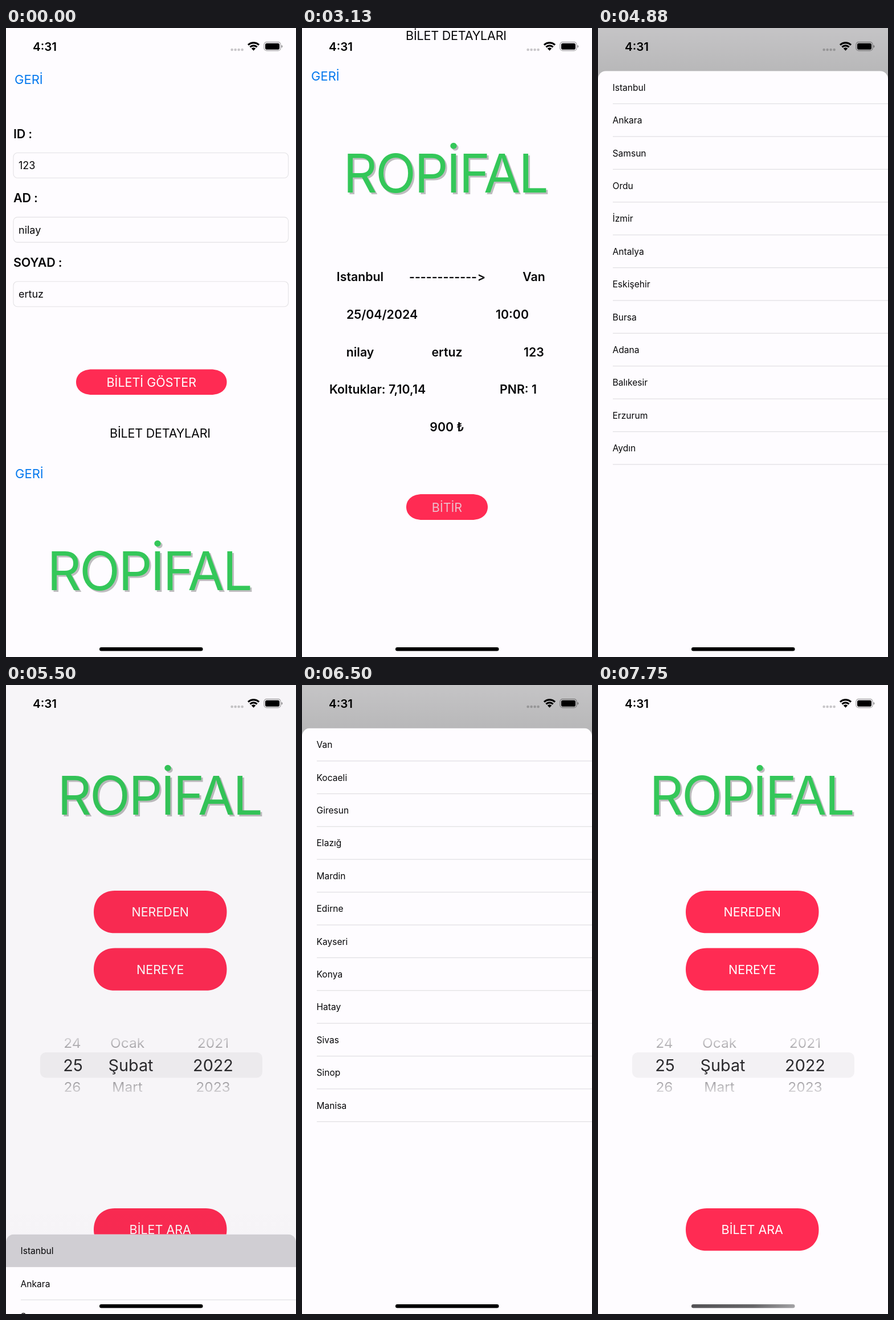
These frames come from a looping animation (509x1101 px, 8000 ms). An HTML page with a canvas:

```html
<!DOCTYPE html>
<html lang="tr">
<head>
<meta charset="utf-8">
<title>Bilet</title>
<style>
html, body { margin: 0; width: 100%; height: 100%; overflow: hidden; background: #fefcff; }
canvas { display: block; width: 100vw; height: 100vh; }
</style>
</head>
<body>
<canvas id="stage" width="509" height="1101"></canvas>
<script>
const W = 509, H = 1101, LOOP = 8000, TICK = 125;
const BG = '#fefcff', RED = '#ff2b53', BLUE = '#0579ee', GREEN = '#34c759', INK = '#070709';
const PRESSED = '#ecbecb';
const FACE = 'Inter, Roboto, "Noto Sans", sans-serif';
const ROW = 57.4, SHEET_TOP = 74;
const BRAND = 'ROPİFAL', FIRST = 'nilay', LAST = 'ertuz';
const FROM = ['Istanbul', 'Ankara', 'Samsun', 'Ordu', 'İzmir', 'Antalya',
  'Eskişehir', 'Bursa', 'Adana', 'Balıkesir', 'Erzurum', 'Aydın'];
const TO = ['Van', 'Kocaeli', 'Giresun', 'Elazığ', 'Mardin', 'Edirne',
  'Kayseri', 'Konya', 'Hatay', 'Sivas', 'Sinop', 'Manisa'];

const ctx = document.getElementById('stage').getContext('2d');

// Critically damped spring: distance left to travel, from 1 to 0.
function left(ms) {
  const x = Math.max(0, ms) * 0.0175;
  return (1 + x) * Math.exp(-x);
}

function text(str, x, y, size, { weight = 400, color = INK, align = 'left', gap = 0 } = {}) {
  ctx.font = `${weight} ${size}px ${FACE}`;
  ctx.letterSpacing = gap + 'px';
  ctx.textAlign = align;
  ctx.fillStyle = color;
  ctx.fillText(str, x, y);
}

function box(x, y, w, h, r, color) {
  ctx.beginPath();
  ctx.roundRect(x, y, w, h, r);
  ctx.fillStyle = color;
  ctx.fill();
}

// Rounded box with smooth corners reaching ex along and ey down the sides.
function smoothBox(x, y, w, h, ex, ey) {
  const r = x + w, b = y + h, k = 0.4, cx = ex * k, cy = ey * k;
  ctx.beginPath();
  ctx.moveTo(x + ex, y);
  ctx.lineTo(r - ex, y);
  ctx.bezierCurveTo(r - cx, y, r, y + cy, r, y + ey);
  ctx.lineTo(r, b - ey);
  ctx.bezierCurveTo(r, b - cy, r - cx, b, r - ex, b);
  ctx.lineTo(x + ex, b);
  ctx.bezierCurveTo(x + cx, b, x, b - cy, x, b - ey);
  ctx.lineTo(x, y + ey);
  ctx.bezierCurveTo(x, y + cy, x + cx, y, x + ex, y);
  ctx.fillStyle = RED;
  ctx.fill();
}

function button(label, x, y, w, h, pressed) {
  smoothBox(x, y, w, h, h > 60 ? 37 : 28, h / 2);
  text(label, x + w / 2, y + h / 2 + 8, 21.5, { align: 'center', color: pressed ? PRESSED : '#fff' });
}

function brand(cx, y) {
  const style = { align: 'center', gap: -3 };
  text(BRAND, cx + 2, y + 2.5, 93, { ...style, color: 'rgba(0,0,0,.25)' });
  text(BRAND, cx - 1, y, 93, { ...style, color: GREEN });
}

function fill(color) {
  ctx.fillStyle = color;
  ctx.fillRect(0, 0, W, H);
}

function form() {
  fill(BG);
  text('GERİ', 15, 98, 22, { color: BLUE });
  [['ID :', '123'], ['AD :', FIRST], ['SOYAD :', LAST]].forEach(([label, value], i) => {
    const y = 218.5 + i * 112.6;
    text(label, 13, y - 26, 21.5, { weight: 600, gap: -0.2 });
    ctx.beginPath();
    ctx.roundRect(13, y, 482.5, 44, 7);
    ctx.strokeStyle = '#e3e2e5';
    ctx.lineWidth = 1.1;
    ctx.stroke();
    text(value, 22, y + 28.7, 18);
  });
  button('BİLETİ GÖSTER', 123, 597.5, 264.5, 44.5);
}

function ticket(y, pressed) {
  ctx.save();
  ctx.translate(0, y);
  fill(BG);
  text('BİLET DETAYLARI', 270.5, 21, 21.5, { align: 'center', gap: -0.2 });
  text('GERİ', 16, 92, 22, { color: BLUE });
  brand(252, 288);
  const bold = (str, cx, base) => text(str, cx, base, 21.3, { weight: 600, align: 'center' });
  bold('Istanbul', 102, 443);
  bold('-'.repeat(12), 247.5, 443);
  bold('>', 315, 443);
  bold('Van', 407, 443);
  bold('25/04/2024', 140.5, 509);
  bold('10:00', 369, 509);
  bold(FIRST, 102, 574.5);
  bold(LAST, 254.5, 574.5);
  bold('123', 407, 574.5);
  bold('Koltuklar: 7,10,14', 132.5, 640);
  bold('PNR: 1', 379.5, 640);
  bold('900 ₺', 254.5, 706);
  button('BİTİR', 183, 816, 143, 45, pressed);
  ctx.restore();
}

function fadedRow(words, base, top, bottom) {
  const g = ctx.createLinearGradient(0, -19, 0, 3);
  g.addColorStop(0, top);
  g.addColorStop(1, bottom);
  ctx.save();
  ctx.translate(0, base);
  ctx.scale(1, 0.92);
  words.forEach((word, i) => text(word, [116.5, 213, 363.5][i], 0, 24.5, { align: 'center', color: g }));
  ctx.restore();
}

function home(pressed) {
  fill(BG);
  brand(270, 227);
  button('NEREDEN', 154, 360, 233.5, 74.3, pressed === 'from');
  button('NEREYE', 154, 460.5, 233.5, 74.3, pressed === 'to');
  box(60, 643, 390, 44.5, 10, '#f3f1f4');
  fadedRow(['24', 'Ocak', '2021'], 634.5, '#dddbde', '#a19fa3');
  ['25', 'Şubat', '2022'].forEach((word, i) =>
    text(word, [117.5, 219, 363.5][i], 676, 28.8, { align: 'center', color: '#2b2a2d' }));
  fadedRow(['26', 'Mart', '2023'], 712, '#a19fa3', '#dddbde');
  button('BİLET ARA', 154, 916, 233.5, 74.3);
}

// open: 0 hidden, 1 fully raised
function sheet(names, open, picked) {
  if (open < 0.0002) return;
  const y = H - (H - SHEET_TOP) * open;
  fill(`rgba(0,0,0,${0.2 * open})`);
  const shade = open ** 1.5;
  const g = ctx.createLinearGradient(0, y - 130, 0, y);
  g.addColorStop(0, 'rgba(0,8,0,0)');
  g.addColorStop(0.43, `rgba(0,8,0,${0.03 * shade})`);
  g.addColorStop(1, `rgba(0,8,0,${0.095 * shade})`);
  ctx.fillStyle = g;
  ctx.fillRect(0, y - 130, W, 145);

  ctx.save();
  ctx.beginPath();
  ctx.roundRect(0, y, W, H, [14, 14, 0, 0]);
  ctx.clip();
  ctx.fillStyle = BG;
  ctx.fillRect(0, y, W, H);
  if (picked) {
    ctx.fillStyle = '#d0ced3';
    ctx.fillRect(0, y, W, ROW);
  }
  names.forEach((name, i) => {
    const top = y + i * ROW;
    text(name, 25.5, top + 34.7, 15.6);
    if (picked && i === 0) return;
    ctx.fillStyle = '#e0dfe2';
    ctx.fillRect(26, top + ROW - 0.6, W, 1.2);
  });
  ctx.restore();
}

function statusBar() {
  text('4:31', 68, 40, 20.6, { weight: 600, align: 'center', color: '#000' });
  for (let i = 0; i < 4; i++) box(394.3 + i * 6, 35.7, 4.6, 4.6, 2.3, 'rgba(0,0,0,.21)');

  const cx = 434.5, cy = 39.8, mid = -Math.PI / 2, half = 0.76;
  ctx.strokeStyle = ctx.fillStyle = '#000';
  ctx.lineWidth = 3.1;
  for (const r of [13.9, 8.9]) {
    ctx.beginPath();
    ctx.arc(cx, cy, r, mid - half, mid + half);
    ctx.stroke();
  }
  ctx.beginPath();
  ctx.moveTo(cx, cy);
  ctx.arc(cx, cy, 5.5, mid - half, mid + half);
  ctx.fill();

  ctx.beginPath();
  ctx.roundRect(453, 24.7, 29, 15, 4.5);
  ctx.strokeStyle = 'rgba(0,0,0,.4)';
  ctx.lineWidth = 1.2;
  ctx.stroke();
  box(455, 26.7, 25, 11, 2.8, '#000');
  box(483.5, 30, 1.8, 4.6, [0, 1.8, 1.8, 0], 'rgba(0,0,0,.45)');
}

function homeBar(faded) {
  let color = '#000';
  if (faded) {
    color = ctx.createLinearGradient(164, 1084, 345, 1091);
    color.addColorStop(0, '#535255');
    color.addColorStop(0.6, '#676669');
    color.addColorStop(1, '#a3a2a5');
  }
  box(164, 1084, 181.5, 6.6, 3.3, color);
}

function draw(t) {
  if (t < 3375) {
    form();
    ticket(H * left(t + 73.4), t >= 3125);
  } else {
    home(t >= 4250 && t < 4375 ? 'from' : t >= 6000 && t < 6125 ? 'to' : '');
    if (t < 4250) ticket(H * (1 - left(t - 3355)), false);
    else if (t < 5375) sheet(FROM, 1 - left(t - 4355), false);
    else if (t < 6000) sheet(FROM, left(t - 5300), true);
    else if (t < 7250) sheet(TO, 1 - left(t - 6000), false);
    else sheet(TO, left(t - 7140.3), true);
  }
  statusBar();
  homeBar(t >= 7250);
}

const start = performance.now();
function loop() {
  const t = (performance.now() - start) % LOOP;
  // The screen refreshes eight times a second, on 10 ms marks.
  draw(Math.floor(Math.floor(t / 10) * 10 / TICK) * TICK);
  requestAnimationFrame(loop);
}
loop();
</script>
</body>
</html>
```
